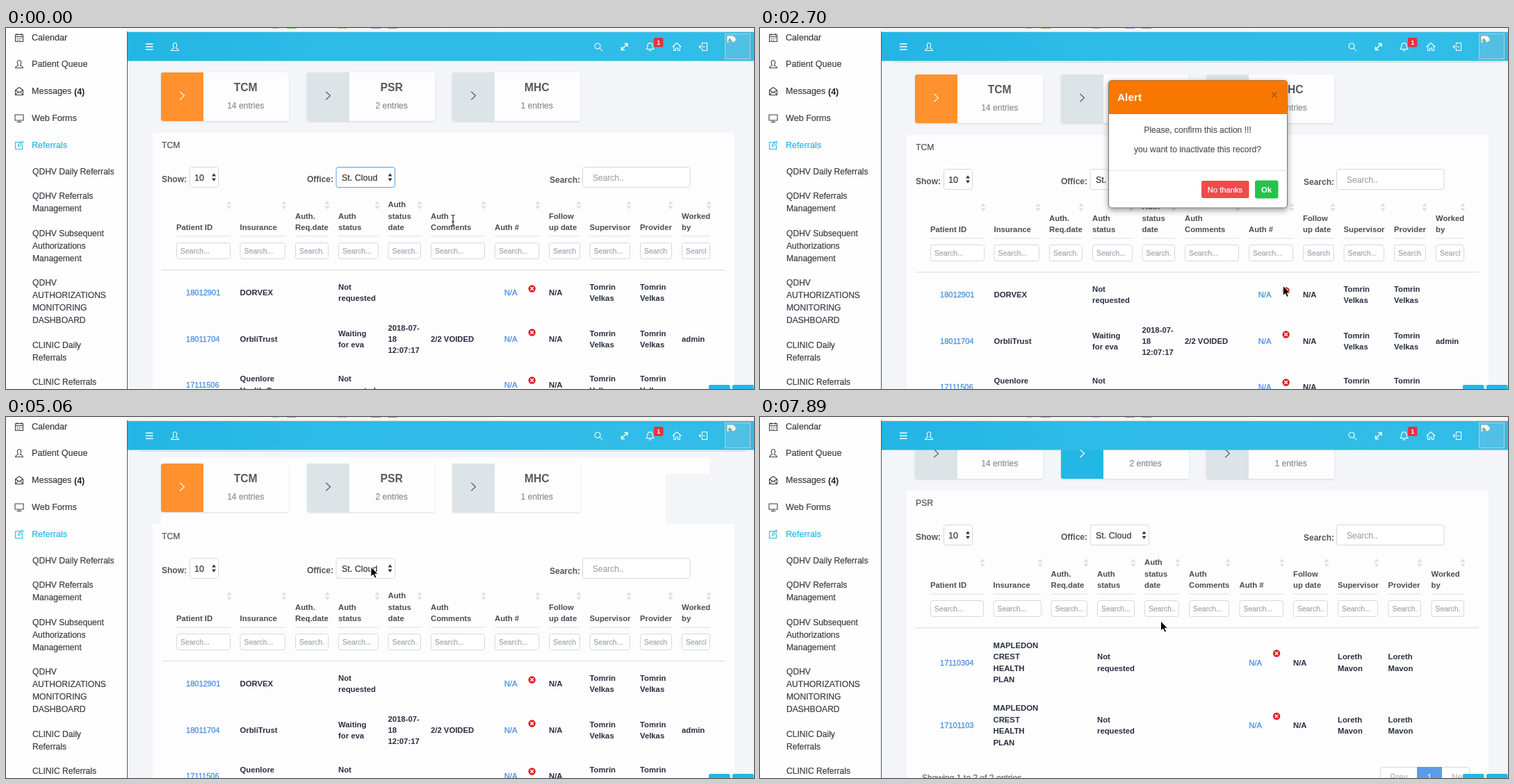
Animation, 1076 px wide and 520 px high, one loop 8000 ms. Source, as an HTML page:

```html
<!DOCTYPE html>
<html lang="en">
<head>
<meta charset="utf-8">
<title>Referrals</title>
<style>
html, body { margin: 0; width: 100%; height: 100%; overflow: hidden; background: #f4f5f9; }
svg { display: block; }
text { font-family: "Liberation Sans", Arial, sans-serif; white-space: pre; stroke-width: .2; }
.b { font-weight: 700; stroke: none; }
.m { text-anchor: middle; }
.link { fill: #4a90e2; stroke: #4a90e2; stroke-width: .3; }
.line { fill: none; stroke-linecap: round; stroke-linejoin: round; }
</style>
</head>
<body>
<svg id="stage" width="1076" height="520" viewBox="0 0 1076 520"></svg>
<script>
const LOOP = 8000;
const CYAN = '#23b7e5', ORANGE = '#ff922e', IDLE = '#dce4e8', INK = '#2a2e42', HEAD = '#4b4d55';

const text = (x, y, s, size, fill, cls = '') =>
  `<text x="${x}" y="${y}" font-size="${size}" fill="${fill}" stroke="${fill}" class="${cls}">${s}</text>`;
const rect = (x, y, w, h, fill, more = '') =>
  `<rect x="${x}" y="${y}" width="${w}" height="${h}" fill="${fill}" ${more}/>`;
const line = (d, color, width = 1, more = '') =>
  `<path class="line" d="${d}" stroke="${color}" stroke-width="${width}" ${more}/>`;
const group = (id, body, more = '') => `<g id="${id}" ${more}>${body}</g>`;
const at = (x, y, body) => `<g transform="translate(${x} ${y})">${body}</g>`;

// ---- icons, centred on 0,0 ----
const ICONS = {
  calendar: 'M-5.5 -4.5H5.5V5.5H-5.5ZM-5.5 -1.5H5.5M-3 -6V-3.5M3 -6V-3.5M-3 1H-2M0 1H1M3 1H3.5M-3 3.5H-2M0 3.5H1',
  user: 'M0 -5.5C-2.6 -5.5 -3 -3 -2.6 -1.2C-2.2 .6 -1.5 1 -1.5 2C-3 2.8 -5.5 3 -5.5 5.5H5.5C5.5 3 3 2.8 1.5 2C1.5 1 2.2 .6 2.6 -1.2C3 -3 2.6 -5.5 0 -5.5Z',
  mail: 'M-5.5 -1.5L0 -5.5L5.5 -1.5V5.5H-5.5ZM-5.5 -1.5L0 2L5.5 -1.5M-5.5 5.5L-1.5 1.2M5.5 5.5L1.5 1.2',
  screen: 'M-6 -5H6V3H-6ZM0 3V5.5M-3 5.5H3',
  edit: 'M2 -4.5H-5.5V5.5H4.5V-.5M-1.5 1.5L-1 -1L4.5 -6L6 -4.5L1 1Z',
  search: 'M3 -1A4 4 0 1 1 -5 -1A4 4 0 1 1 3 -1ZM2 2L6 6',
  bell: 'M-5.5 3.5C-3.5 2 -4 -.5 -3.5 -2.5C-3 -4.5 -1.5 -5.5 0 -5.5C1.5 -5.5 3 -4.5 3.5 -2.5C4 -.5 3.5 2 5.5 3.5ZM-1.5 5C-1 6.3 1 6.3 1.5 5',
  home: 'M-6 0L0 -5.5L6 0M-4.3 -1.2V5.5H-1.5V2H1.5V5.5H4.3V-1.2',
  exit: 'M-1.5 -2.5V-5.5H5.5V5.5H-1.5V2.5M2.5 0H-6M-3.5 -2.5L-6 0L-3.5 2.5',
};
const icon = (name, x, y, color) => at(x, y, line(ICONS[name], color, 1.05));

// ---- fixed frame ----
function sidebar() {
  const items = [['calendar', 14, 'Calendar'], ['user', 52, 'Patient Queue'], ['mail', 91, 'Messages'],
    ['screen', 130, 'Web Forms'], ['edit', 169, 'Referrals']];
  const subs = [[210.5, 'QDHV Daily Referrals'], [246, 'QDHV Referrals', 'Management'],
    [300, 'QDHV Subsequent', 'Authorizations', 'Management'],
    [371, 'QDHV', 'AUTHORIZATIONS', 'MONITORING', 'DASHBOARD'],
    [461, 'CLINIC Daily', 'Referrals'], [514, 'CLINIC Referrals']];
  let out = rect(0, 0, 174, 520, '#fefefe') + rect(174, 5, 1, 515, '#55575c');
  for (const [name, y, label] of items) {
    const color = name === 'edit' ? CYAN : '#3c3e45';
    out += icon(name, 19, y, color) + text(37, y + 4.4, label, 12.6, color);
  }
  out += text(98, 95.6, '(4)', 12.4, '#222', 'b');
  for (const [y, ...lines] of subs)
    lines.forEach((s, i) => out += text(38, y + i * 18, s, 12.1, '#3c3e45'));
  return out;
}

function header() {
  const specks = [[383, 9, '#b9bec4'], [404, 14, '#8fb878'], [477, 13, '#c9bf8d'], [525, 14, '#8f9fd0'],
    [549, 14, '#8aa0a8'], [628, 10, '#fff'], [704, 12, '#fff']];
  let out = rect(175, 5, 901, 42.5, 'url(#bar)') + rect(0, 0, 1076, 5, '#f5f5f5') + rect(0, 5, 1076, 1, '#d9d9da');
  for (const [x, w, c] of specks) out += rect(x, 0, w, 1, c);
  out += line('M201.5 23H211M201.5 27H211M201.5 31H211', '#fff', 1.6);
  out += icon('user', 243, 27, '#fff') + icon('search', 852, 27, '#fff') + icon('bell', 926.5, 27, '#fff')
    + icon('home', 965, 27, '#fff') + icon('exit', 1003, 27, '#fff');
  out += line('M886.5 30L893 23.5M890 22.5H894V26.5M885.5 27.5V31.5H889.5', '#fff', 1.5);
  out += rect(932, 14, 13.5, 13.5, '#e8323c', 'rx="2"') + text(938.7, 24.2, '1', 9, '#fff', 'b m');
  out += rect(1034.5, 8.5, 36, 36, '#52bfe4', 'stroke="#bccdd3"');
  out += `<path d="M1037 11H1046L1050 15V18L1046 21L1043 18L1037 22Z" fill="#eef7fb" stroke="#98aab0" stroke-width=".8"/>`
    + `<path d="M1038 19L1041 15L1044 18Z" fill="#5fae4f"/>`;
  return out;
}

// ---- scrolling page ----
function card(i, name, count) {
  const x = Math.round(223.4 + i * 209.3);
  return rect(x, 64, 184, 70, '#fdfdfd', 'rx="3" filter="url(#soft)"')
    + `<path id="tile${i}" d="M${x + 61} 64H${x + 3}Q${x} 64 ${x} 67V131Q${x} 134 ${x + 3} 134H${x + 61}Z"/>`
    + line(`M${x + 27.5} 92L${x + 33.5} 97.5L${x + 27.5} 103`, '#555', 1.1, `id="chev${i}"`)
    + text(x + 121.7, 91, name, 15.7, '#58595e', 'b m') + text(x + 121.7, 116, count, 12.1, '#8a8b90', 'm');
}

const arrows = (x, y, s, gap, fill) =>
  `<path d="M${x - s} ${y - gap}L${x} ${y - gap - s * 1.4}L${x + s} ${y - gap}ZM${x - s} ${y + gap}L${x} ${y + gap + s * 1.4}L${x + s} ${y + gap}Z" fill="${fill}"/>`;
const box = (x, y, w, h, more = '') =>
  rect(x + .5, y + .5, w - 1, h - 1, '#fff', `rx="3" stroke="#d5d8dd" ${more}`);

function controls() {
  return text(224, 222, 'Show:', 12, '#55565b', 'b') + box(264, 200, 42, 30) + text(271, 219.5, '10', 12.5, '#333')
    + arrows(299, 215, 3, 1.5, '#333')
    + text(433, 222, 'Office:', 12, '#55565b', 'b') + box(474.5, 200, 85.5, 30, 'id="office"')
    + text(483, 219.5, 'St. Cloud', 12.5, '#333') + arrows(552.5, 215, 3, 1.5, '#333')
    + text(782, 223, 'Search:', 12, '#55565b', 'b') + box(829, 200, 155.5, 30)
    + text(844, 220, 'Search..', 12, '#a3a5aa');
}

const TITLES = ['Patient ID', 'Insurance', 'Auth.|Req.date', 'Auth|status', 'Auth|status|date', 'Auth|Comments',
  'Auth #', 'Follow|up date', 'Supervisor', 'Provider', 'Worked|by'];

function tableHead(cols) {
  let out = '';
  cols.forEach(([x, right], i) => {
    const lines = TITLES[i].split('|'), w = right - x;
    lines.forEach((s, k) => out += text(x, 291 - (lines.length - 1 - k) * 16.3, s, 11.3, HEAD, 'b'));
    out += arrows(right - 2, 255.2, 3.6, 1.1, '#e0e1e4') + rect(x, 299.5, w, 1, '#dfe0e3') + box(x, 309, w, 24)
      + `<svg x="${x + 5}" y="309" width="${w - 11}" height="24">${text(1, 15.6, 'Search...', 10.4, '#a0a3ad')}</svg>`;
  });
  return out + rect(224, 348, 810, 1.2, '#dfe0e3');
}

const cell = (x, mid, s) => s.split('|').map((part, i, all) =>
  text(x, mid + 4 + (i - (all.length - 1) / 2) * 16.4, part, 11.3, INK, 'b')).join('');

// cells: column index -> text, lines split by |
function row(cols, mid, iconY, id, cells) {
  const x = i => cols[i][0];
  let out = text(x(0) + 14, mid + 4, id, 11.1, '', 'link') + text(x(6) + 13.7, mid + 4, 'N/A', 11.3, '', 'link')
    + cell(x(7), mid, 'N/A');
  for (const i in cells) out += cell(x(i), mid, cells[i]);
  return out + at(x(6) + 53.6, iconY, '<circle r="5.2" fill="#e01f26"/>' + line('M-1.8 -1.8L1.8 1.8M1.8 -1.8L-1.8 1.8', '#fff', 1.6));
}

const COLS_A = [[245, 323], [336.5, 402], [416, 464], [478, 536], [549.5, 597], [611, 689], [703, 767],
  [781, 826], [839.5, 898], [912, 958], [972, 1013]];
const COLS_B = [[245, 322], [335.5, 405], [418.5, 471], [485, 539], [553, 603], [617, 675], [689.5, 753],
  [767, 817], [831, 889], [903.5, 951], [965.5, 1013]];

function tableA() {
  const mids = [381, 448, 513.5];
  const staff = (a, b) => mids.map(m => cell(839.5, m, a) + cell(912, m, b)).join('');
  return tableHead(COLS_A)
    + row(COLS_A, mids[0], 375.5, '18012901', { 1: 'DORVEX', 3: 'Not|requested' })
    + row(COLS_A, mids[1], 438.5, '18011704', { 1: 'OrbliTrust', 3: 'Waiting|for eva', 4: '2018-07-|18|12:07:17', 5: '2/2 VOIDED', 10: 'admin' })
    + row(COLS_A, mids[2], 507.5, '17111506', { 1: 'Quenlore|Health Care', 3: 'Not|requested' })
    + group('staff', staff('Tomrin|Velkas', 'Tomrin|Velkas'))
    + group('noStaff', staff('Not Data', 'Not|Data'));
}

function tableB() {
  const cells = { 1: 'MAPLEDON|CREST|HEALTH|PLAN', 3: 'Not|requested', 8: 'Loreth|Mavon', 9: 'Loreth|Mavon' };
  return tableHead(COLS_B) + row(COLS_B, 398.5, 385.5, '17110304', cells) + row(COLS_B, 489, 476, '17101103', cells)
    + text(233, 569, 'Showing 1 to 2 of 2 entries', 12.1, '#66676c')
    + box(892, 549, 129, 31) + rect(945, 549, 36, 31, '#5b9bea')
    + text(919, 568, 'Prev', 12.1, '#b4b6bb', 'm') + text(963, 568, '1', 12.1, '#fff', 'm') + text(995, 568, 'Next', 12.1, '#b4b6bb');
}

function page() {
  return rect(193, 46, 873, 1, '#d3d5d9')
    + group('wash', rect(223, 55, 726, 96, '#fdfdfd'))
    + group('washEdge', rect(949, 79, 63, 72, '#fdfdfd'))
    + group('washRest', rect(223, 55, 789, 9, '#fdfdfd') + rect(949, 64, 63, 15, '#fdfdfd'))
    + card(0, 'TCM', '14 entries') + card(1, 'PSR', '2 entries') + card(2, 'MHC', '1 entries')
    + rect(211, 151, 837, 500, '#fdfdfd')
    + text(224, 173, '<tspan id="label">TCM</tspan>', 12.2, '#4f5056')
    + controls() + group('tableA', tableA()) + group('tableB', tableB());
}

function dialog() {
  return rect(501.5, 75.5, 257, 183.5, '#fff', 'rx="4" stroke="#777" filter="url(#deep)"')
    + `<path d="M502 124V79Q502 75.5 506 75.5H754.5Q758.5 75.5 758.5 79V124Z" fill="#f77700"/>`
    + text(514, 105, 'Alert', 15.4, '#fff', 'b') + line('M736.5 93L743 99.5M743 93L736.5 99.5', '#a45a12', 1.7)
    + text(629.5, 151, 'Please, confirm this action !!!', 12.1, '#55565b', 'm')
    + text(629.5, 178.5, 'you want to inactivate this record?', 12.1, '#55565b', 'm')
    + rect(502, 205, 256.5, 1, '#e0e1e4')
    + rect(635, 220, 68.5, 25, '', 'rx="2.5" id="no"') + text(669, 236.5, 'No thanks', 11.2, '#fff', 'm')
    + rect(712, 219.5, 33.5, 26, '#27c24c', 'rx="2.5"') + text(728.5, 236.5, 'Ok', 11.3, '#fff', 'b m');
}

const pointers = group('arrow', '<path d="M0 0V14L3.3 11L5.6 16L8 15L5.7 10.2H10Z" fill="#000" stroke="#fff" stroke-width=".9"/>')
  + group('ibeam', line('M-2.5 -7.5Q0 -7.5 0 -6Q0 -7.5 2.5 -7.5M0 -6V6M-2.5 7.5Q0 7.5 0 6Q0 7.5 2.5 7.5M-1.5 2H1.5', '#222', 1.1))
  + group('hand', '<path d="M-1.6 8V1.2Q-1.6 0 -.4 0Q.9 0 .9 1.2V5Q2.6 4.2 3.2 5.4Q4.8 4.6 5.5 6Q7.5 5.6 7.5 7.5V10.5L6.3 14.5H-.3L-3.6 9.6Q-4.3 8 -3 7.6Z" fill="#fff" stroke="#000" stroke-width="1.1" stroke-linejoin="round"/>'
    + line('M1.4 9V12M3.2 9V12M5 9V12', '#000', .7));

const stage = document.getElementById('stage');
stage.innerHTML = `<defs>
  <linearGradient id="bar"><stop stop-color="#23b5e4"/><stop offset=".3" stop-color="#2dbbe7"/><stop offset="1" stop-color="#31bde8"/></linearGradient>
  <filter id="soft" x="-5%" y="-10%" width="110%" height="125%"><feDropShadow dx="0" dy="1" stdDeviation=".8" flood-opacity=".13"/></filter>
  <filter id="deep" x="-10%" y="-10%" width="120%" height="125%"><feDropShadow dx="0" dy="3" stdDeviation="4" flood-opacity=".4"/></filter>
  </defs>` + rect(0, 0, 1076, 520, '#f4f5f9') + group('page', page()) + header() + sidebar()
  + rect(1011, 514, 30.5, 10, CYAN, 'rx="2"') + rect(1045, 514, 30.5, 10, CYAN, 'rx="2"')
  + group('dialog', dialog()) + group('cursor', pointers);

// ---- motion ----
const $ = id => document.getElementById(id);
const show = (id, on) => $(id).setAttribute('display', on ? 'inline' : 'none');
const held = (table, t) => table.filter(step => t >= step[0]).pop();

const SCROLL = [[0, 0], [150, 3], [7740, -22], [7890, -45]];
// time, shift, opacity
const DIALOG = [[0, 0, 0], [1950, -23.5, .72], [2100, -4, .95], [2250, 0, 1], [4030, -14, .5], [4180, 0, 0]];
// first step, last step, steps, target
const MOVES = [[150, 150, 1, 643, 283], [480, 1350, 7, 757, 379.5], [2700, 3590, 7, 674, 234],
  [4330, 5060, 6, 525, 216], [5360, 5810, 4, 490, 91], [6700, 7290, 5, 576.5, 294]];
const ease = p => p * p * (3 - 2 * p);

function cursorAt(t) {
  let x = 643, y = 277;
  for (const [from, to, n, tx, ty] of MOVES) {
    if (t < from) break;
    const gap = (to - from) / (n - 1) || 1;
    const p = ease(Math.min(n, Math.floor((t - from) / gap + .05) + 1) / n);
    x += (tx - x) * p;
    y += (ty - y) * p;
  }
  return [x, y];
}

function draw(t) {
  const psr = t >= 6100, loaded = t >= 6850;
  $('page').setAttribute('transform', `translate(0 ${held(SCROLL, t)[1]})`);
  $('label').textContent = psr ? 'PSR' : 'TCM';
  for (let i = 0; i < 3; i++) {
    const active = i === (psr ? 1 : 0);
    $('tile' + i).setAttribute('fill', active ? (psr ? CYAN : ORANGE) : IDLE);
    $('chev' + i).setAttribute('stroke', active ? '#fff' : '#55585c');
  }
  $('office').setAttribute('stroke', t < 1800 ? '#5b9fdc' : '#d5d8dd');
  show('tableA', !loaded);
  show('tableB', loaded);
  show('staff', !psr);
  show('noStaff', psr);
  show('wash', t >= 4180 && !psr);
  show('washEdge', t >= 4180 && t < 4330);
  show('washRest', t >= 4180 && t < 7740);

  const [, shift, alpha] = held(DIALOG, t);
  show('dialog', alpha > 0);
  $('dialog').setAttribute('transform', `translate(0 ${shift})`);
  $('dialog').setAttribute('opacity', alpha);

  const [x, y] = cursorAt(t);
  const onButton = alpha > 0 && x > 635 && x < 703 && y > 220 && y < 245;
  const hand = onButton || (t > 5360 && y < 137);
  $('no').setAttribute('fill', onButton ? '#ee3a3b' : '#f04a4b');
  show('ibeam', t < 480);
  show('hand', hand);
  show('arrow', t >= 480 && !hand);
  $('cursor').setAttribute('transform', `translate(${x} ${y})`);
}

const start = performance.now();
function tick() {
  draw((performance.now() - start) % LOOP);
  requestAnimationFrame(tick);
}
tick();
</script>
</body>
</html>
```
